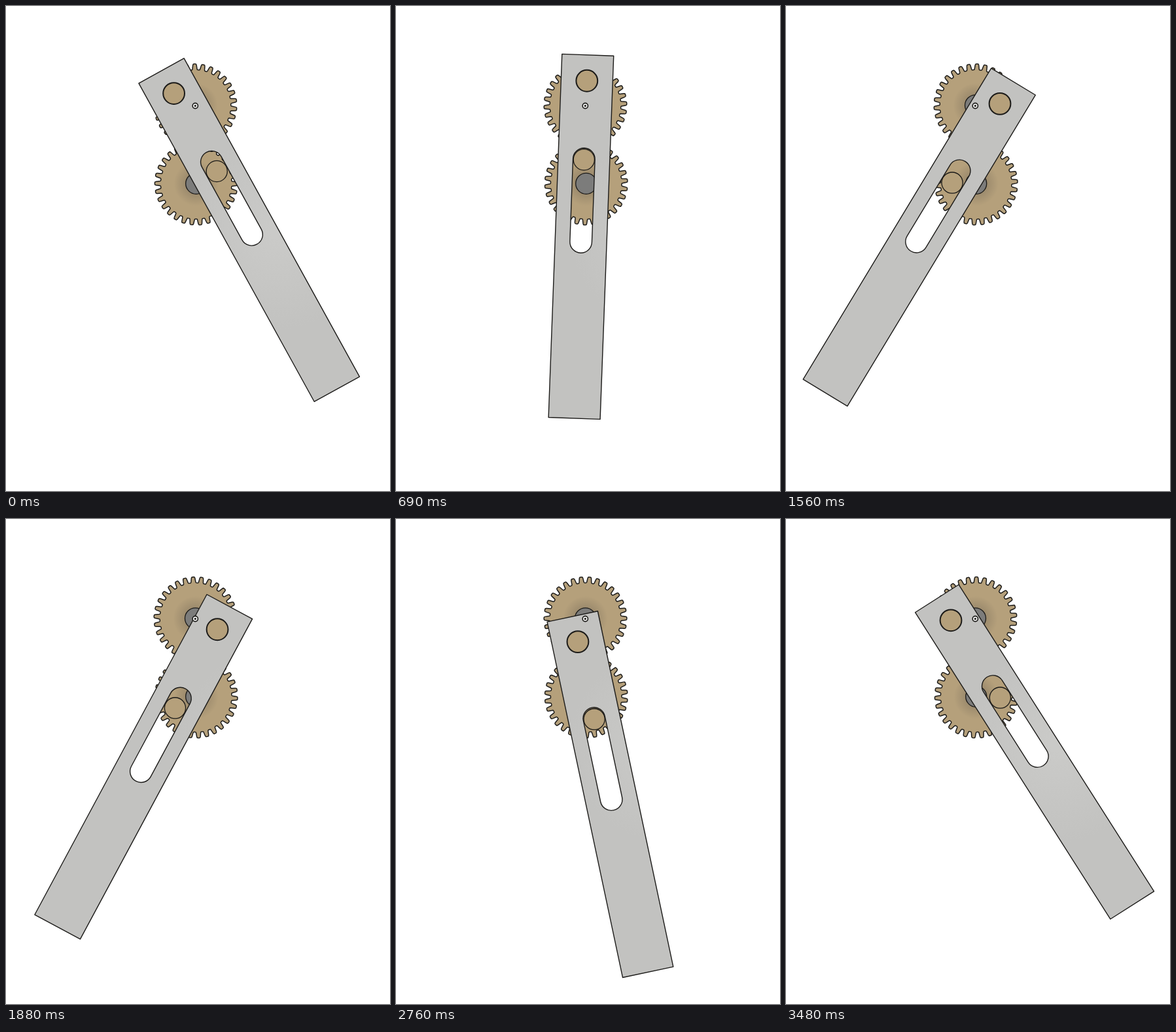
These frames come from a looping animation (587 by 741 pixels, 3.56 s). An HTML page with a canvas:

```html
<!DOCTYPE html>
<html lang="en">
<head>
<meta charset="utf-8">
<title>Geared slotted arm</title>
<style>
  html, body { margin: 0; width: 587px; height: 741px; overflow: hidden; background: #fff; }
  canvas { display: block; }
</style>
</head>
<body>
<canvas id="stage" width="587" height="741"></canvas>
<script>
const ctx = document.getElementById('stage').getContext('2d');
const TAU = Math.PI * 2, RAD = Math.PI / 180;
const INK = '#1b1a18', BRASS = '#b5a07b', SHAFT = '#7c7c7b';

const TOP = { x: 289.5, y: 151.8, crank: 37.6 };
const LOW = { x: 290.7, y: 271.3, crank: 36.7 };
const LEAD = 1.8;          // lower crank runs slightly ahead, degrees
const TEETH = 30, ROOT = 54.3, TIP = 63.3;
const ARM = { half: 39.5, from: -39.5, to: 516 };
const SLOT = { r: 16.8, from: 119.6, to: 246.3 };

// Steps last 80 ms, apart from these
const STEPS = 45, ODD = { 0: 70, 4: 70, 7: 70, 11: 70, 28: 70, 32: 90 };
const ends = [];
for (let i = 0, t = 0; i < STEPS; i++) ends.push(t += ODD[i] || 80);
const LOOP = ends[STEPS - 1];

// [step, crank angle in degrees clockwise from up]
const KEYS = [[0, -61], [9, 3.5], [13, 32.4], [14, 42.3], [20, 86.3],
              [28, 147.3], [35, 197.9], [44, 265.4]];

function crankAngle(step) {
  let i = 1;
  while (i < KEYS.length - 1 && step > KEYS[i][0]) i++;
  const [s0, a0] = KEYS[i - 1], [s1, a1] = KEYS[i];
  return a0 + (a1 - a0) * (step - s0) / (s1 - s0);
}

function polar(r, deg) {
  return [r * Math.sin(deg * RAD), -r * Math.cos(deg * RAD)];
}

function gearPath() {
  const p = new Path2D(), pitch = 360 / TEETH;
  for (let i = 0; i < TEETH; i++) {
    const a = i * pitch;
    const line = (r, d) => p.lineTo(...polar(r, a + d));
    const bend = (r, d, r2, d2) =>
      p.quadraticCurveTo(...polar(r, a + d), ...polar(r2, a + d2));
    line(ROOT + 1, -3.7);
    line(TIP - 2, -2.6);
    bend(TIP, -2.3, TIP, -1.2);
    line(TIP, 1.2);
    bend(TIP, 2.3, TIP - 2, 2.6);
    line(ROOT + 1, 3.7);
    bend(ROOT, 4.1, ROOT, 4.9);
    line(ROOT, pitch - 4.9);
    bend(ROOT, pitch - 4.1, ROOT + 1, pitch - 3.7);
  }
  p.closePath();
  return p;
}

function armPath() {
  const p = new Path2D();
  p.rect(-ARM.half, ARM.from, ARM.half * 2, ARM.to - ARM.from);
  p.moveTo(-SLOT.r, SLOT.from);
  p.arc(0, SLOT.from, SLOT.r, Math.PI, TAU);
  p.arc(0, SLOT.to, SLOT.r, 0, Math.PI);
  p.closePath();
  return p;
}

const gearShape = gearPath(), armShape = armPath();

function glow(x, y, r0, r1, inner, outer) {
  const g = ctx.createRadialGradient(x, y, r0, x, y, r1);
  g.addColorStop(0, inner);
  g.addColorStop(1, outer);
  return g;
}

function disc(x, y, r, fill, width) {
  ctx.beginPath();
  ctx.arc(x, y, r, 0, TAU);
  ctx.fillStyle = fill;
  ctx.fill();
  if (width) {
    ctx.lineWidth = width;
    ctx.stroke();
  }
}

function gear(c, deg) {
  ctx.save();
  ctx.translate(c.x, c.y);
  ctx.rotate(deg * RAD);
  ctx.fillStyle = glow(0, 0, 14, 34, '#9a896c', BRASS);
  ctx.fill(gearShape);
  ctx.lineWidth = 1.5;
  ctx.stroke(gearShape);
  ctx.restore();
  disc(c.x, c.y, 16, SHAFT, 1.3);
}

function arm(p, q) {
  ctx.save();
  // Light stays fixed on the stage while the arm moves
  ctx.fillStyle = glow(415, 345, 10, 150, '#cacac8', '#c2c2c0');
  const turn = Math.atan2(p.x - q.x, q.y - p.y);
  const m = new DOMMatrix().translate(p.x, p.y).rotate(turn / RAD);
  const shape = new Path2D();
  shape.addPath(armShape, m);
  ctx.fill(shape, 'evenodd');
  ctx.lineWidth = 1.4;
  ctx.stroke(shape);
  ctx.restore();
}

function draw(step) {
  const a = crankAngle(step), b = a + LEAD;
  const [px, py] = polar(TOP.crank, a), [qx, qy] = polar(LOW.crank, -b);
  const p = { x: TOP.x + px, y: TOP.y + py };
  const q = { x: LOW.x + qx, y: LOW.y + qy };

  ctx.fillStyle = '#fff';
  ctx.fillRect(0, 0, 587, 741);
  ctx.strokeStyle = INK;
  ctx.lineJoin = 'round';

  gear(LOW, -b - 4.9);
  gear(TOP, a);
  disc(q.x, q.y, 16.1, BRASS, 1.3);
  arm(p, q);
  disc(p.x, p.y, 16.4, BRASS, 2);
  disc(289.3, 152.5, 4.1, '#f4f4f2', 1.6);
  disc(289.3, 152.5, 1.6, INK);
}

let shown = -1;
function tick() {
  const t = performance.now() % LOOP;
  const step = ends.findIndex(end => t < end);
  if (step !== shown) draw(shown = step);
  requestAnimationFrame(tick);
}
tick();
</script>
</body>
</html>
```
